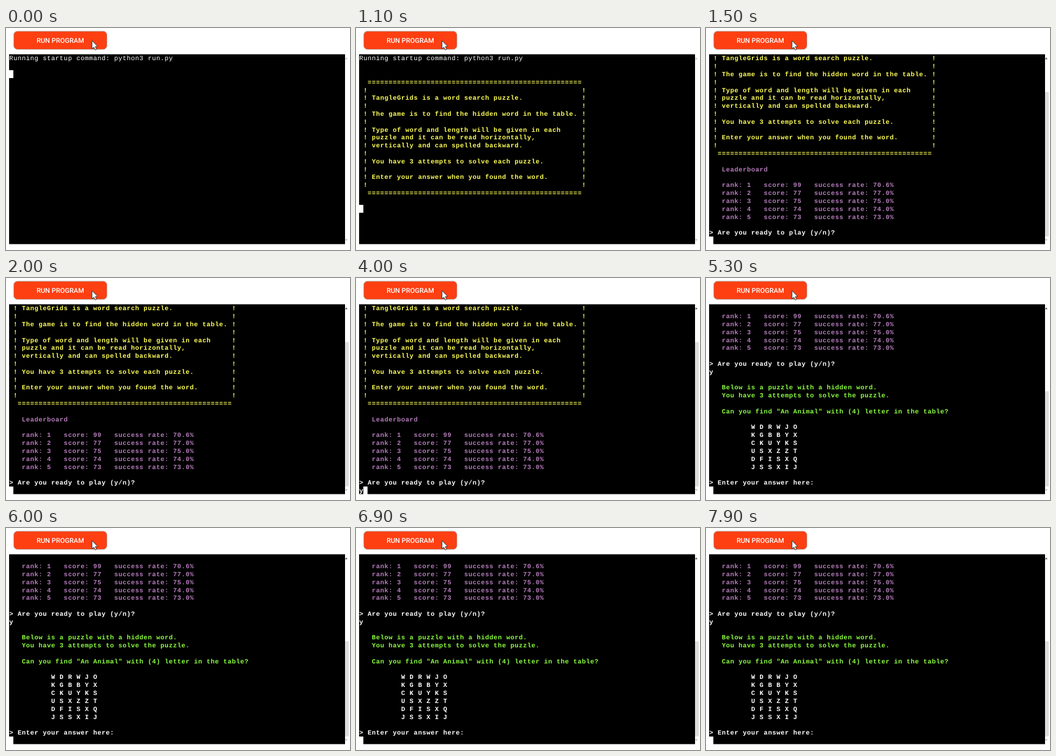
Recreate the animation shown at these times as an HTML page. Size 554x359 px, loop 8000 ms.

```html
<!DOCTYPE html>
<html lang="en">
<head>
<meta charset="utf-8">
<title>Terminal word game</title>
<style>
  html, body { margin: 0; width: 100%; height: 100%; overflow: hidden; background: #fff; }
  svg { display: block; }
  /* Glyph advance (0.6em) plus spacing gives the 6.768px column pitch. */
  .term text {
    font: 10.4px "Courier New", "Liberation Mono", monospace;
    letter-spacing: .528px;
    white-space: pre;
    text-rendering: geometricPrecision;
  }
  .term .bold { font-weight: bold; }
  .label { font: 500 10.9px Roboto, Arial, sans-serif; text-rendering: geometricPrecision; }
</style>
</head>
<body>
<svg width="554" height="359" viewBox="0 0 554 359">
  <rect x="12.5" y="5.2" width="150" height="29.3" rx="6" fill="#fe3f12" stroke="#b99a93"/>
  <text class="label" x="49.2" y="23.6" fill="#fff">RUN PROGRAM</text>
  <path d="M138.5 20.6v13l3-2.7 2.2 4.7 2.2-1-2.1-4.6h4z" fill="#fff" stroke="#333" stroke-width=".9"/>

  <rect id="thumb" x="546" width="6" fill="#dedede"/>
  <path id="up" d="M546 50.5l2-3 2 3z"/>
  <path id="down" d="M546 341.5l2 3 2-3z"/>

  <rect x="5" y="42.5" width="541" height="307" fill="#000"/>
  <rect id="caret" width="6.8" height="12.8" fill="#fff"/>
  <g class="term" id="rows"></g>
</svg>
<script>
const LOOP = 8000, COL = 6.768, ROW = 12.81, LEFT = 5, TOP = 42.6, VISIBLE = 24;
const YELLOW = '#ffff58', PURPLE = '#b47cba', GREEN = '#8cff40', WHITE = '#fff';
const $ = id => document.getElementById(id);

const lines = [];
const put = (row, text, color = WHITE, bold = true) => lines.push({ row, text, color, bold });

put(0, 'Running startup command: python3 run.py', WHITE, false);

// Framed introduction
const intro = {
  5: 'TangleGrids is a word search puzzle.',
  7: 'The game is to find the hidden word in the table.',
  9: 'Type of word and length will be given in each',
  10: 'puzzle and it can be read horizontally,',
  11: 'vertically and can spelled backward.',
  13: 'You have 3 attempts to solve each puzzle.',
  15: 'Enter your answer when you found the word.'
};
const bar = '  ' + '='.repeat(51);
put(3, bar, YELLOW);
for (let r = 4; r <= 16; r++) put(r, ' ! ' + (intro[r] || '').padEnd(50) + '!', YELLOW);
put(17, bar, YELLOW);

put(19, '   Leaderboard', PURPLE);
[[99, '70.6'], [77, '77.0'], [75, '75.0'], [74, '74.0'], [73, '73.0']].forEach(([score, rate], i) =>
  put(21 + i, `   rank: ${i + 1}   score: ${score}   success rate: ${rate}%`, PURPLE));
put(27, '> Are you ready to play (y/n)?');
put(28, 'y');

put(30, '   Below is a puzzle with a hidden word.', GREEN);
put(31, '   You have 3 attempts to solve the puzzle.', GREEN);
put(33, '   Can you find "An Animal" with (4) letter in the table?', GREEN);
['WDRWJO', 'KGBBYX', 'CKUYKS', 'USXZZT', 'DFISXQ', 'JSSXIJ'].forEach((s, i) =>
  put(35 + i, ' '.repeat(10) + [...s].join(' ')));
put(42, '> Enter your answer here:');

// Caret position in the buffer at each step; everything above it is printed.
const steps = [
  { at: 0, row: 2, col: 0 },
  { at: 1100, row: 19, col: 0 },
  { at: 1500, row: 28, col: 0 },
  { at: 3600, row: 28, col: 1 },
  { at: 4500, row: 43, col: 0 }
];

function setAttrs(el, attrs) {
  for (const k in attrs) el.setAttribute(k, attrs[k]);
  return el;
}

function draw({ row, col }) {
  const scroll = Math.max(0, row - VISIBLE + 1);
  const printed = l => l.row >= scroll && (l.row < row || (l.row === row && col > 0));
  $('rows').replaceChildren(...lines.filter(printed).map(l => {
    const t = document.createElementNS('http://www.w3.org/2000/svg', 'text');
    t.textContent = l.text;
    return setAttrs(t, {
      x: LEFT + .2, y: TOP + (l.row - scroll) * ROW + 9.7,
      fill: l.color, class: l.bold ? 'bold' : ''
    });
  }));
  setAttrs($('caret'), { x: LEFT + col * COL, y: TOP + (row - scroll) * ROW });

  const track = 282, size = track * VISIBLE / (row + 1);
  setAttrs($('thumb'), { y: 337 - size, height: scroll ? size : 0 });
  $('up').setAttribute('fill', scroll ? '#555' : '#b5b5b5');
  $('down').setAttribute('fill', '#b5b5b5');
}

let shown;
function tick() {
  const t = performance.now() % LOOP;
  const step = steps.findLast(s => s.at <= t);
  if (step !== shown) draw(shown = step);
  requestAnimationFrame(tick);
}
tick();
</script>
</body>
</html>
```
